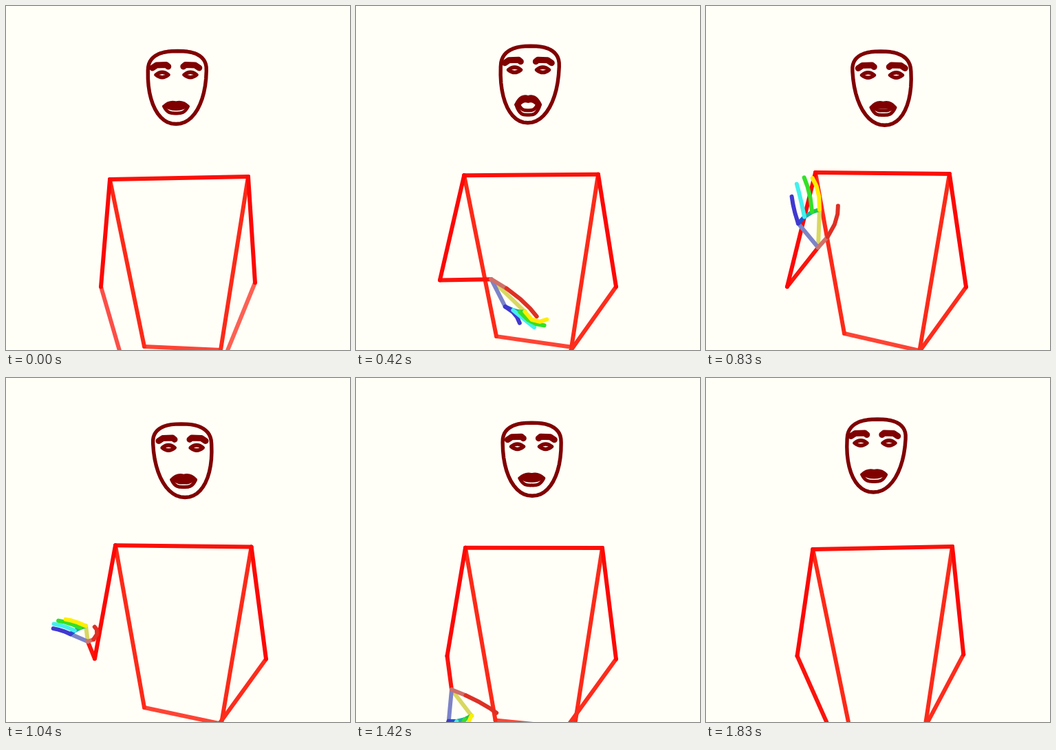
These frames come from a looping animation (500x500 px, 1870 ms). An HTML page with a canvas:

```html
<!DOCTYPE html>
<html lang="en">
<head>
<meta charset="utf-8">
<title>Signing figure</title>
<style>
html, body { margin: 0; width: 100%; height: 100%; overflow: hidden; background: #fffff8; }
canvas { display: block; width: 500px; height: 500px; }
</style>
</head>
<body>
<canvas id="stage" width="500" height="500"></canvas>
<script>
const ctx = document.getElementById('stage').getContext('2d');
const LOOP = 1870, FPS = 24, LAST = 44;
const PAPER = '#fffff8', MAROON = '#800000';
const FINGERS = ['#ffee00', '#34e028', '#44f0ec', '#4038d0'];
const KNUCKLES = ['#20c848', '#18b0a0', '#1858d0'];

// Key points: [step, x, y, lean, mouth opening]
const headPath = [
  [0, 247.5, 100, -2, 0], [7, 250, 97, -8, 1], [12, 252, 91, 0, .8], [14, 254, 100, 4, .7],
  [20, 256, 100.5, 7, .2], [30, 257, 102, 6, .05], [38, 251.5, 96.5, -4, 0], [44, 245.5, 94.5, -6, 0]];
const wristPath = [
  [0, 172, 525], [7, 203, 428], [14, 181, 368], [20, 163, 351], [26, 116, 389],
  [30, 120, 403], [34, 139, 453], [38, 167, 497], [44, 181, 513]];

// Hand: index knuckle, little knuckle, their angles, their curls, finger length, thumb angle, curl, length
const hanging = a => [40, 58, 3, 65, a, a, 0, 0, 42, 36, 19, 90];
const fist = [62, 15, 47, -10, -30, -63, -86, 40, 45, 15, -13, 77];
const raised = [2, -55, -29, -35, -92, -107, -12, 4, 53, -48, -13, 69];
const aside = [-3, -20, -25, -9, -160, -160, -6, -6, 33, -18, -38, 27];
const handPath = [
  [7, ...hanging(85)], [14, ...fist], [20, ...raised], [26, ...aside], [30, ...aside], [36, ...hanging(-275)]];

const mix = (a, b, u) => a + (b - a) * u;
const offset = (p, x, y) => [p[0] + x, p[1] + y];

function ramp(n, from, to) {
  const u = Math.min(1, Math.max(0, (n - from) / (to - from)));
  return u * u * (3 - 2 * u);
}

// Start value plus eased moves [amount, from, to]
const move = (n, start, ...steps) => steps.reduce((v, [d, a, b]) => v + d * ramp(n, a, b), start);

// Hermite interpolation, level at turning points
function follow(path, n) {
  const end = path.length - 1;
  n = Math.min(path[end][0], Math.max(path[0][0], n));
  let i = 0;
  while (i < end - 1 && path[i + 1][0] <= n) i++;
  const a = path[i], b = path[i + 1], span = b[0] - a[0], u = (n - a[0]) / span;
  const slope = (k, j) => {
    if (k === 0 || k === end) return 0;
    const rate = m => (path[m + 1][j] - path[m][j]) / (path[m + 1][0] - path[m][0]);
    const s = rate(k - 1), t = rate(k);
    return s * t > 0 ? 2 * s * t / (s + t) : 0;
  };
  return a.map((v, j) => mix(v, b[j], u * u * (3 - 2 * u)) +
    span * u * (1 - u) * (slope(i, j) * (1 - u) - slope(i + 1, j) * u)).slice(1);
}

function line(points, color, width = 6, closed = false) {
  ctx.beginPath();
  points.forEach(p => ctx.lineTo(p[0], p[1]));
  if (closed) ctx.closePath();
  ctx.strokeStyle = color;
  ctx.lineWidth = width;
  ctx.stroke();
}

// Jointed limb: every part turns further by the same angle
function chain(start, angle, turn, length, shares) {
  const points = [start];
  shares.forEach((s, i) => {
    const a = (angle + turn * i) * Math.PI / 180;
    points.push(offset(points[i], Math.cos(a) * length * s, Math.sin(a) * length * s));
  });
  return points;
}

function drawBody(n) {
  const shoulderL = [move(n, 151, [8, 1, 14], [-4, 34, 46]), move(n, 252, [-10, 5, 14], [7, 18, 44])];
  const shoulderR = [move(n, 352, [6, 14, 30]), move(n, 248, [-4, 0, 14], [3, 20, 30], [-2, 38, 44])];
  const hipL = [move(n, 201, [5, 0, 7], [-5, 7, 14], [8, 30, 44]),
    move(n, 495, [-23, 4, 14], [4, 14, 20], [34, 21, 43])];
  const hipR = [move(n, 312, [4, 0, 7], [-7, 7, 14], [9, 14, 38]),
    move(n, 500, [-11, 7, 14], [12, 14, 20], [9, 20, 38])];
  const elbowL = [move(n, 138, [-20, 0, 14], [22, 20, 30], [-15, 30, 38], [8, 38, 45]),
    move(n, 408, [-12, 0, 14], [12, 14, 20], [-8, 30, 38], [4, 38, 44])];
  const elbowR = [move(n, 362, [16, 0, 9], [-4, 38, 45]), move(n, 402, [6.5, 0, 12], [-7, 37, 45])];
  const wristL = follow(wristPath, n);
  const wristR = [move(n, 319, [-13, 0, 12], [13, 39, 45]), 508];

  line([hipL, hipR], '#ff4434');
  line([shoulderL, hipL], '#fd2a18');
  line([shoulderR, hipR], '#fd2a18');
  ctx.globalAlpha = mix(.75, 1, ramp(n, 0, 5));
  line([elbowR, wristR], '#fd2c1c');
  line([elbowL, wristL], '#fb140c');
  ctx.globalAlpha = 1;
  line([shoulderL, shoulderR], '#fd1008');
  line([shoulderL, elbowL], '#fd0804');
  line([shoulderR, elbowR], '#fd0804');
  if (n > 3 && n < 36) drawHand(wristL, follow(handPath, n));
}

function drawHand(wrist, [ix, iy, lx, ly, a0, a3, c0, c3, size, ta, tc, ts]) {
  const knuckle = [0, 1, 2, 3].map(i => {
    const u = i / 3, arch = 1 + .3 * u * (1 - u);
    return offset(wrist, mix(ix, lx, u) * arch, mix(iy, ly, u) * arch);
  });
  const thumb = chain(wrist, ta, tc, ts, [.3, .3, .23, .17]);
  line([wrist, knuckle[0]], '#d8d860');
  line([wrist, knuckle[3]], '#7c84c8');
  line(thumb.slice(0, 2), '#d07068');
  line(thumb.slice(1), '#de3024');
  KNUCKLES.forEach((c, i) => line(knuckle.slice(i, i + 2), c));
  for (let i = 3; i >= 0; i--) {
    const u = i / 3, length = size * (.9 + .4 * u - .54 * u * u);
    line(chain(knuckle[i], mix(a0, a3, u), mix(c0, c3, u), length, [.4, .32, .28]), FINGERS[i]);
  }
}

// Egg made of two superellipse halves
function outline(crown, chin) {
  const points = [], wide = .27;
  for (let i = 0; i < 48; i++) {
    const a = i / 24 * Math.PI, c = Math.cos(a), s = Math.sin(a);
    const power = 2 / (s < 0 ? 2.5 : 2.15);
    const x = Math.sign(c) * Math.abs(c) ** power;
    const v = wide + Math.sign(s) * Math.abs(s) ** power * (s < 0 ? wide : 1 - wide);
    points.push([mix(crown[0], chin[0], v) + x * 42.5, mix(crown[1], chin[1], v)]);
  }
  return points;
}

function lip(x, y, w, top, bottom) {
  const p = new Path2D();
  p.moveTo(x - w, y - 2);
  p.bezierCurveTo(x - w * .7, y + top, x - w * .35, y + top * 1.25, x, y + top);
  p.bezierCurveTo(x + w * .35, y + top * 1.25, x + w * .7, y + top, x + w, y - 2);
  p.bezierCurveTo(x + w * .7, y + bottom * 1.1, x + w * .35, y + bottom, x, y + bottom);
  p.bezierCurveTo(x - w * .35, y + bottom, x - w * .7, y + bottom * 1.1, x - w, y - 2);
  return p;
}

function drawMouth(x, y, gap) {
  const outer = lip(x, y, 17.5, -7 - 6 * gap, 8 + 5.5 * gap);
  const inner = lip(x, y, 13.5, -1.5 - 6 * gap, 1.5 + 5.5 * gap);
  ctx.save();
  ctx.beginPath();
  ctx.rect(x - 25, y - 30, 50, 30);
  ctx.clip();
  ctx.fillStyle = MAROON;
  ctx.fill(outer);
  ctx.restore();
  ctx.fillStyle = PAPER;
  ctx.fill(inner);
  ctx.lineWidth = 5;
  ctx.stroke(outer);
  ctx.stroke(inner);
}

function drawFace(n) {
  const [x, y, lean, gap] = follow(headPath, n);
  const crown = [x + 1 - .45 * lean, y - 34.5];
  const chin = [x + .5 + .45 * lean, y + 71.5 + 6 * gap];
  line(outline(crown, chin), MAROON, 5.4, true);
  for (const s of [-1, 1]) {
    const brow = [[34, -10], [28, -14], [14, -14.5], [11, -12]];
    line(brow.map(p => [x - .7 + s * p[0], y + p[1]]), MAROON, 9);
    const e = x + s * 20.5;
    ctx.beginPath();
    ctx.moveTo(e - 9, y);
    ctx.quadraticCurveTo(e, y - 7.5, e + 9, y);
    ctx.quadraticCurveTo(e, y + 7.5, e - 9, y);
    ctx.closePath();
    ctx.lineWidth = 5.4;
    ctx.stroke();
  }
  drawMouth(x + .22 * lean, y + 48 + 5 * gap, gap);
}

function render() {
  const t = performance.now() % LOOP;
  let n = LAST;
  while (n > 0 && Math.round(n * 100 / FPS) * 10 > t) n--;
  ctx.fillStyle = PAPER;
  ctx.fillRect(0, 0, 500, 500);
  ctx.lineCap = ctx.lineJoin = 'round';
  drawBody(n);
  drawFace(n);
  requestAnimationFrame(render);
}
render();
</script>
</body>
</html>
```
